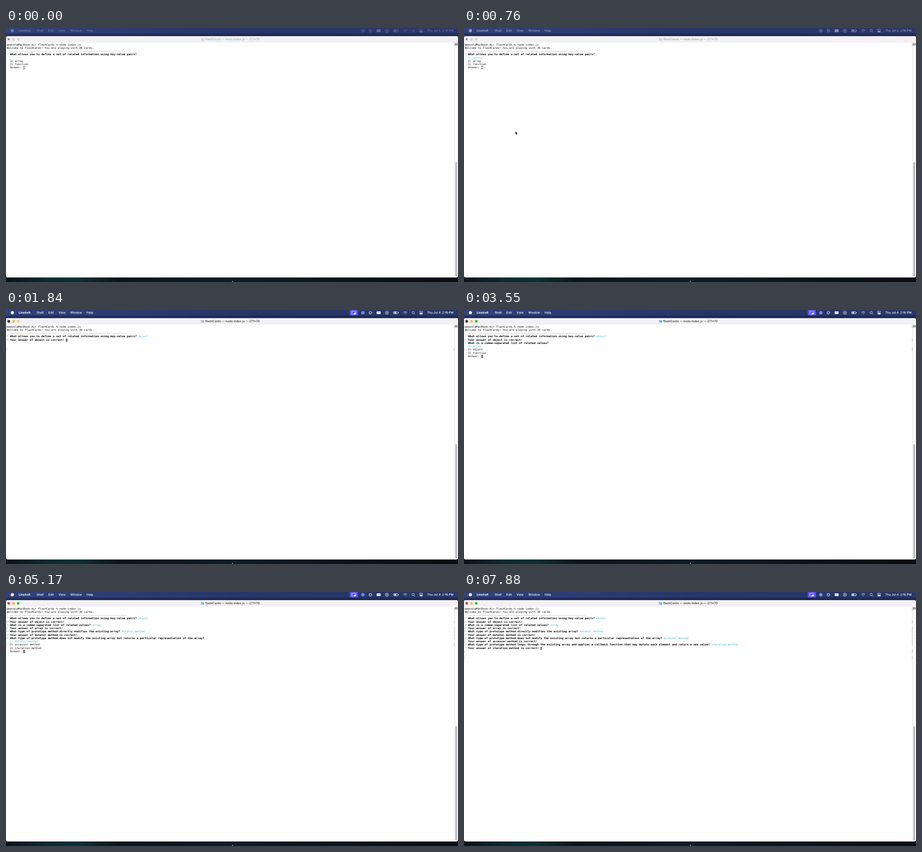
An HTML page that plays this animation: 998x561 px, repeating every 8 s.

```html
<!DOCTYPE html>
<html lang="en">
<head>
<meta charset="utf-8">
<title>Flash cards</title>
<style>
  html, body { margin: 0; width: 100%; height: 100%; overflow: hidden; background: #07121a; }
  #stage { position: absolute; left: 0; top: 0; width: 998px; height: 561px; overflow: hidden; text-rendering: geometricPrecision; }
  svg { position: absolute; left: 0; top: 0; }
  svg text { font: 500 6.6px Inter, "Liberation Sans", sans-serif; white-space: pre; }
  #menu text { fill: #fff; }
  svg .bold { font-weight: 700; }
  #title { fill: #444; font-weight: 600; }
  .line { fill: none; stroke: #fff; stroke-width: .8; }

  #rows { position: absolute; left: 1.7px; top: 33.5px; font: 6.046px/7.27px "DejaVu Sans Mono", "Liberation Mono", monospace; color: #111; white-space: pre; }
  #rows div { position: relative; height: 7.27px; }
  #rows b { color: #000; }
  #rows i { font-style: normal; color: #38b9c4; }
  #rows u { display: inline-block; box-sizing: border-box; width: 3.64px; height: 7px; vertical-align: top; text-decoration: none; background: #8c8c8c; border: .6px solid #666; }
  .mark::before, .mark::after { position: absolute; top: 0; color: #999; }
  .mark::before { content: "["; left: -2.4px; }
  .mark::after { content: "]"; left: 986px; }

  .idle #menu { opacity: .5; }
  .idle #live { display: none; }
  .idle #title { fill: #aaa; }
  .idle #rows i { color: #6fcbd6; }
  .idle #rows u { background: none; }
  .soft #menu { opacity: .3; filter: blur(.7px); }
  .soft #title { fill: #9cbccb; filter: blur(.7px); }
  .soft #rows i { opacity: .35; }
</style>
</head>
<body>
<div id="stage">
  <svg width="998" height="561" viewBox="0 0 998 561">
    <defs>
      <linearGradient id="sky">
        <stop offset="0" stop-color="#33427b"/>
        <stop offset=".55" stop-color="#263566"/>
        <stop offset="1" stop-color="#2b3868"/>
      </linearGradient>
      <linearGradient id="ground">
        <stop offset="0" stop-color="#08131d"/>
        <stop offset=".09" stop-color="#0b2a31"/>
        <stop offset=".16" stop-color="#0c3034"/>
        <stop offset=".25" stop-color="#08151d"/>
        <stop offset=".5" stop-color="#0b1d28"/>
        <stop offset="1" stop-color="#070d14"/>
      </linearGradient>
    </defs>
    <rect width="998" height="30" fill="url(#sky)"/>
    <rect y="12" width="998" height="8" fill="#17234d" opacity=".55"/>
    <rect y="540" width="998" height="21" fill="url(#ground)"/>
    <circle cx="500" cy="559.5" r="1" fill="#cdd5da"/>

    <g id="menu">
      <circle cx="14" cy="6" r="3.4" fill="#fff"/>
      <text class="bold" x="28" y="8.3">Lineholt</text>
      <text x="67.5" y="8.3">Shell</text>
      <text x="93.5" y="8.3">Edit</text>
      <text x="116" y="8.3">View</text>
      <text x="142" y="8.3">Window</text>
      <text x="178" y="8.3">Help</text>
      <g id="live">
        <rect x="759" width="18" height="12" rx="2" fill="#5c56f0"/>
        <rect x="763.5" y="3" width="9" height="6" rx="1" class="line"/>
        <path d="M768 9.5v-2a1.8 1.8 0 0 1 3.600 0v2z" fill="#fff"/>
      </g>
      <circle cx="788" cy="6" r="3.8" fill="#7588e0"/>
      <circle cx="804.500" cy="6" r="2.300" class="line" stroke-width="1.500"/>
      <circle cx="804.500" cy="6" r="3.600" class="line" stroke-dasharray="1.400 1.430"/>
      <rect x="818.500" y="3" width="8.500" height="6" rx="1" fill="#fff"/>
      <path d="M820 5h5.500M820 7h5.500" stroke="#55618c" stroke-width=".5"/>
      <circle cx="841" cy="6" r="3.600" class="line"/>
      <path d="M840 4.300l3 1.700-3 1.700z" fill="#fff"/>
      <rect x="855.500" y="3.500" width="9.500" height="5" rx="1.300" class="line"/>
      <path d="M857 4.800h5v2.400h-5zM866 5h1v2h-1z" fill="#fff"/>
      <path d="M877.500 5q4-3.600 8 0M879 6.700q2.500-2.200 5 0M881.500 8.400v.6" class="line" stroke-linecap="round"/>
      <circle cx="899" cy="5.500" r="2.500" class="line"/>
      <path d="M901 7.500l2 2" class="line"/>
      <rect x="913" y="2.700" width="7" height="2.800" rx="1.400" class="line"/>
      <rect x="913" y="6.700" width="7" height="2.800" rx="1.400" fill="#fff"/>
      <text x="930" y="8.300">Thu Jul 4  2:16 PM</text>
    </g>

    <rect y="18" width="998" height="533" rx="4" fill="#fff"/>
    <path d="M0 31V22q0-4 4-4H994q4 0 4 4V31z" fill="#f3f1f4"/>
    <path d="M0 31.300H998" stroke="#dcdadd" stroke-width=".6"/>
    <circle id="close" cx="6" cy="25" r="3"/>
    <circle cx="6" cy="25" r="1" fill="#222"/>
    <circle id="shrink" cx="16.500" cy="25" r="3"/>
    <circle id="grow" cx="27" cy="25" r="3"/>
    <path id="folder" d="M430.500 22h2.700l.8 1h3.500v5h-7z"/>
    <text id="title" x="440" y="27.300">flashCards — node index.js — 271×70</text>

    <path d="M990.500 32V550" stroke="#e3e3e3"/>
    <rect x="991" y="32" width="7" height="515" fill="#fafafa"/>
    <rect x="992" y="34" width="4.500" height="4" fill="#fff" stroke="#444" stroke-width=".8"/>
    <path d="M992 36h4.500" stroke="#444" stroke-width=".8"/>
    <rect x="992" y="296" width="4" height="253" rx="2" fill="#bdb9c1"/>
  </svg>

  <div id="rows"></div>

  <svg width="998" height="561" viewBox="0 0 998 561">
    <path id="pointer" d="M0 0v7.200l1.700-1.500 1.200 2.700 1.300-.6-1.200-2.600h2.200z" fill="#000" stroke="#fff" stroke-width=".5"/>
  </svg>
</div>

<script>
const LOOP = 8000, FOCUS = 1300;
const methods = ["mutator method", "accessor method", "iteration method"];

// picks: arrow-key times; done: answer entered; next: result dismissed
const cards = [
  { ask: "What allows you to define a set of related information using key-value pairs?",
    choices: ["object", "array", "function"], picks: [], done: 1780, next: 2520 },
  { ask: "What is a comma-separated list of related values?",
    choices: ["array", "object", "function"], picks: [], done: 3600, next: 3870 },
  { ask: "What type of prototype method directly modifies the existing array?",
    choices: methods, picks: [], done: 4770, next: 5130 },
  { ask: "What type of prototype method does not modify the existing array but returns a particular representation of the array?",
    choices: methods, picks: [6100], done: 6380, next: 6780 },
  { ask: "What type of prototype method loops through the existing array and applies a callback function that may mutate each element and return a new value?",
    choices: methods, picks: [7330, 7550], done: 7850, next: LOOP }
];

const $ = id => document.getElementById(id);
const bold = text => `<i>?</i> <b>${text}</b> `;
const cursor = "<u></u>";

function screen(t) {
  const rows = [
    "qmavel@MacBook-Air flashCards % node index.js",
    "Welcome to FlashCards! You are playing with 30 cards.",
    "  " + "-".repeat(71)
  ];
  const marks = new Set([0]);
  for (const { ask, choices, picks, done, next } of cards) {
    const pick = picks.filter(p => p <= t).length;
    if (t < done) {
      rows.push(bold(ask));
      choices.forEach((c, i) => {
        const item = `  ${i + 1}) ${c}`;
        rows.push(i === pick ? `<i>${item}</i>` : item);
      });
      rows.push(`  Answer: ${pick ? pick + 1 : ""}${cursor}`);
      break;
    }
    // Every Enter leaves a bracket mark on the row the cursor was in
    marks.add(rows.length + choices.length + 1);
    rows.push(`${bold(ask)}<i>${choices[pick]}</i>`);
    const result = bold(`Your answer of ${choices[pick]} is correct!`);
    if (t < next) {
      rows.push(result + cursor);
      break;
    }
    marks.add(rows.length);
    rows.push(result);
  }
  while (rows.length <= Math.max(...marks)) rows.push("");
  return rows.map((r, i) => `<div${marks.has(i) ? ' class="mark"' : ""}>${r}</div>`).join("");
}

function paint(id, color) { $(id).setAttribute("fill", color); }

let shown = "";
function draw(now) {
  const t = now % LOOP, idle = t < FOCUS;
  $("stage").className = (idle ? "idle" : "") + (t < 600 ? " soft" : "");

  const html = screen(t);
  if (html !== shown) $("rows").innerHTML = shown = html;

  paint("close", idle ? "#c9c7cb" : t < 3600 ? "#3b3836" : "#f0564e");
  paint("shrink", idle ? "#d8d6da" : "#f6bb3c");
  paint("grow", idle ? "#d8d6da" : t < 2520 ? "#efcf78" : "#35c148");
  paint("folder", idle ? "#d3d5d8" : t < 2520 ? "#b9bec2" : "#74c0e2");

  const ease = 1 - Math.min(1, Math.max(0, (t - 600) / 160));
  $("pointer").style.display = t >= 600 && t < FOCUS + 80 ? "" : "none";
  $("pointer").setAttribute("transform", `translate(${113.5 + 14 * ease * ease} ${228 + 22 * ease * ease})`);
  requestAnimationFrame(draw);
}
requestAnimationFrame(draw);
</script>
</body>
</html>
```
